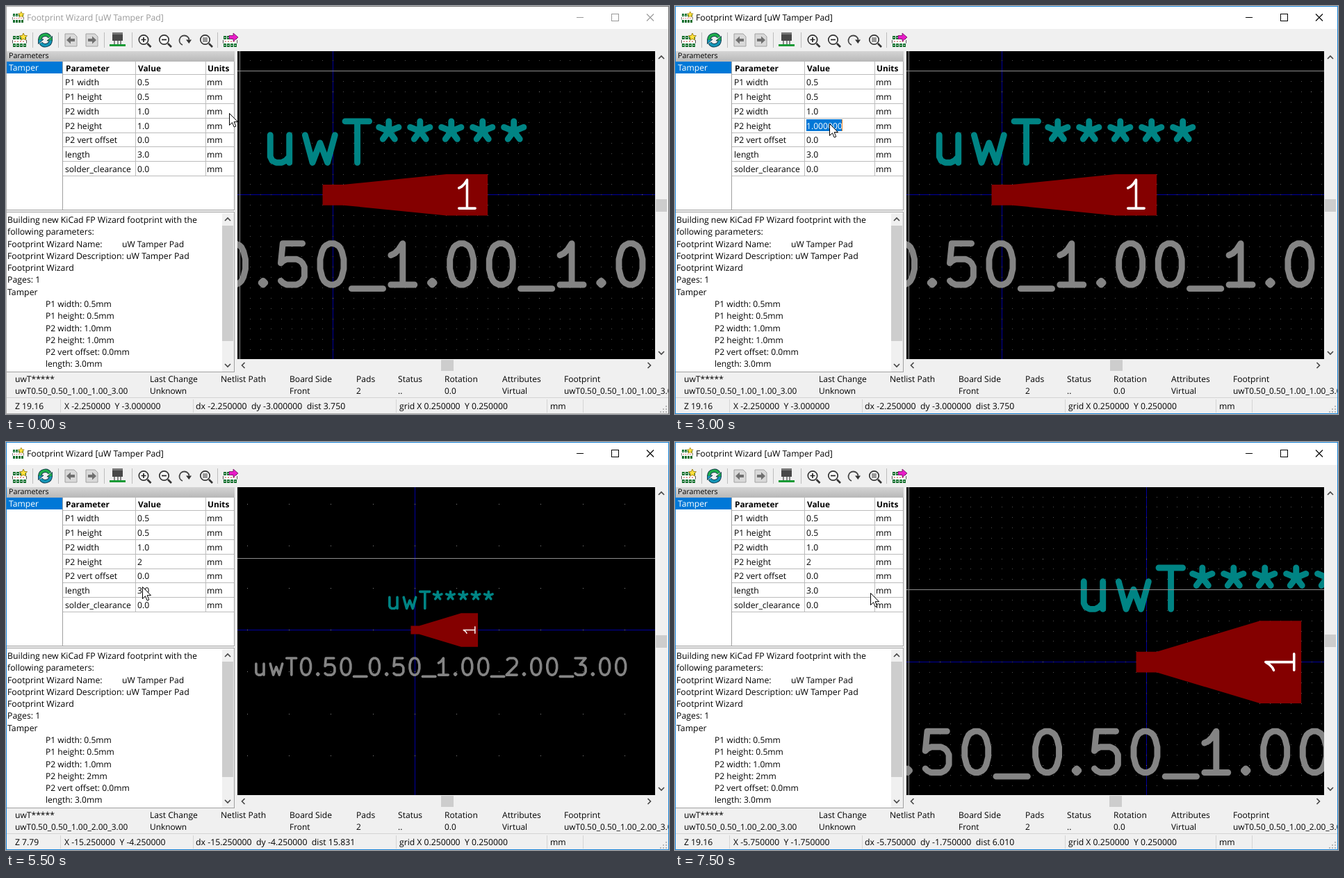
An HTML page for the animation above (8000 ms loop, 954x587 px).

```html
<!DOCTYPE html>
<html lang="en">
<head>
<meta charset="utf-8">
<title>Footprint Wizard</title>
<style>
html, body { margin: 0; width: 100%; height: 100%; overflow: hidden; background: #f0f0f0; }
svg { display: block; width: 954px; height: 587px; }
text { font-family: "Open Sans", "Noto Sans", sans-serif; white-space: pre; text-rendering: geometricPrecision; }
.crisp { shape-rendering: crispEdges; }
</style>
</head>
<body>
<svg id="stage" viewBox="0 0 954 587" xmlns="http://www.w3.org/2000/svg"></svg>
<script>
const LOOP = 8000;
const GREY = '#f0f0f0', BLUE = '#0078d7';

// Zoomed board views: origin, pixels per mm, pad height in mm
const VIEWS = {
  near: { ox: 470.4, oy: 271.8, s: 59.4, h: 1, zoom: '19.16', bar: [626, 278] },
  fit: { ox: 588.5, oy: 270.5, s: 24.15, h: 2, zoom: '7.79', bar: [626, 278] },
  close: { ox: 678.4, oy: 316.6, s: 59.4, h: 2, zoom: '19.16', bar: [625, 277] }
};

// start ms, pointer, view, crosshair in mm, edit mode, caret x
const STEPS = [
  [0, [321, 154], 'near', [-2.25, -3]],
  [500, [218, 138], 'near', [-2.25, -3]],
  [1000, [210, 150], 'near', [-2.25, -3]],
  [1500, [222, 170], 'near', [-2.25, -3]],
  [2000, [222, 170], 'near', [-2.25, -3], 'select', 240],
  [2500, [222, 169], 'near', [-2.25, -3], 'select'],
  [3000, [222, 169], 'near', [-2.25, -3], 'select', 240],
  [3500, null, 'near', [-2.25, -3], 'type', 196],
  [4000, [222, 169], 'fit', [-15.25, -4.25]],
  [5500, [196, 208], 'fit', [-15.25, -4.25]],
  [6000, [281, 222], 'fit', [-15.25, -4.25]],
  [6500, [573, 258], 'fit', [-0.75, -0.5]],
  [7000, [664, 295], 'close', [-0.25, -0.25]],
  [7500, [281, 217], 'close', [-5.75, -1.75]]
];

// Stroke font: advance and path, cap height 21 units, baseline at 0
const GLYPHS = {
  u: [20, 'M5.7-14V-3L6.7-1 8.7 0H11.5L13.5-1 15.4-3M15.4-14V0'],
  w: [22, 'M3.4-14L7.2 0 11-10 14.8 0 18.6-14'],
  T: [16, 'M1.8-21H14M8-21V0'],
  '*': [15.9, 'M8-21V-16M3-18L8-16 13-18M5-12L8-16 11-12'],
  0: [20, 'M9-21H11L13-20 14-19 15-17 16-13V-8L15-4 14-2 13-1 11 0H9L7-1 6-2 5-4 4-8V-13L5-17 6-19 7-20Z'],
  1: [20, 'M16 0H4M10 0V-21L8-18 6-16 4-15'],
  2: [20, 'M4-19L5-20 7-21H12L14-20 15-19 16-17V-15L15-12 3 0H16'],
  3: [20, 'M3-21H16L9-13H12L14-12 15-11 16-9V-4L15-2 14-1 12 0H6L4-1 3-2'],
  5: [20, 'M15-21H5L4-11 5-12 7-13H12L14-12 15-11 16-9V-4L15-2 14-1 12 0H7L5-1 4-2'],
  '.': [10, 'M5-2L6-1 5 0 4-1Z'],
  _: [16, 'M0 2H16']
};

const text = (x, y, s, size = 12.2, fill = '#000', extra = '') =>
  `<text x="${x}" y="${y}" font-size="${size}" fill="${fill}" ${extra}>${s}</text>`;
const rect = (x, y, w, h, fill) =>
  `<rect class="crisp" x="${x}" y="${y}" width="${w}" height="${h}" fill="${fill}"/>`;
const line = (d, color, w = 1, extra = '') =>
  `<path d="${d}" fill="none" stroke="${color}" stroke-width="${w}" ${extra}/>`;
const shape = (d, fill, stroke = 'none', w = 1) =>
  `<path d="${d}" fill="${fill}" stroke="${stroke}" stroke-width="${w}"/>`;
const at = (x, y, body, k = 1) => `<g transform="translate(${x} ${y}) scale(${k})">${body}</g>`;

function strokeText(s, cx, y, unit, width, color) {
  const total = [...s].reduce((sum, c) => sum + GLYPHS[c][0], 0);
  let x = -total / 2, out = '';
  for (const c of s) {
    out += `<path transform="translate(${x})" d="${GLYPHS[c][1]}"/>`;
    x += GLYPHS[c][0];
  }
  return `<g transform="translate(${cx} ${y}) scale(${unit})" fill="none" stroke="${color}"
    stroke-width="${width / unit}" stroke-linecap="round" stroke-linejoin="round">${out}</g>`;
}

// Toolbar icons
function chip() {
  let s = rect(1, 7, 19, 11, '#fff');
  for (let i = 0; i < 4; i++) {
    for (const y of [4, 15]) s += rect(1 + i * 5, y, 4, 5, '#14702f') + rect(2 + i * 5, y + 2, 2, 1, '#cfe8d4');
  }
  return s + line('M0.5 10V14.5M20.5 10V14.5', '#555') + line('M3 12H18', '#c33', 1, 'stroke-dasharray="2 2"');
}
const star = shape('M16 0L17.6 3.4 21.5 3.8 18.7 6.4 19.5 10.2 16 8.3 12.6 10.2 13.3 6.4 10.5 3.8 14.4 3.4Z', '#ffe23c', '#8a6d00', .8);
const lens = line('M14 14L19 19', '#333', 2.6) +
  '<circle cx="8.5" cy="8.5" r="6.7" fill="#fafafa" stroke="#333" stroke-width="1.7"/>';
const page = shape('M1 1H14L18 5V19H1Z', '#d9d9d9', '#a2a2a2');

function refresh() {
  const top = 'M2.8 10A7.7 7.7 0 0 1 17 6.4', low = 'M18.2 11A7.7 7.7 0 0 1 4 14.6';
  return line(top + low, '#10384a', 5.4) +
    shape('M20.5 5V11.5H13Z', '#1fae4b', '#10384a', .9) + shape('M.5 16V9.5H8Z', '#1596b8', '#10384a', .9) +
    line(top, '#1fae4b', 3.6) + line(low, '#1596b8', 3.6);
}

function toolbar() {
  const seps = [38.5, 75.5, 141.5, 181.5, 304.5].map(x => `M${x} 38V60`).join('');
  return rect(1, 33, 952, 32, GREY) + line(seps, '#bdbdbd') +
    at(9, 39, chip() + star) +
    at(46, 38.5, refresh()) +
    at(84, 39, page + shape('M3 10L9 4.5V8H15V12H9V15.5Z', '#707070')) +
    at(114, 39, page + shape('M16 10L10 4.5V8H4V12H10V15.5Z', '#707070')) +
    at(149, 38, rect(4, 0, 15, 12, '#484848') + rect(4, 0, 15, 3, '#777') +
      rect(6, 12, 2, 5, '#888') + rect(11, 12, 2, 5, '#888') + rect(15, 12, 2, 5, '#888') + rect(0, 17, 23, 3, '#159a35')) +
    at(189.5, 40, lens + line('M5 8.5H12M8.5 5V12', '#222', 1.7)) +
    at(219, 40, lens + line('M5 8.5H12', '#222', 1.7)) +
    at(248, 40, line('M6 16A7 7 0 1 1 15.5 8.5', '#444', 1.8) + shape('M11 8.5H19L15.3 14Z', '#333')) +
    at(278, 40, lens + rect(5, 5, 7, 7, '#999')) +
    at(312, 39, chip() + shape('M9 3.5H15V0L22 6 15 12V8.5H9Z', '#e81cc8', '#70105f', .8));
}

const chevron = (x, y, dir) => {
  const d = { up: 'M-4 2L0-2 4 2', down: 'M-4-2L0 2 4-2', left: 'M2-4L-2 0 2 4', right: 'M-2-4L2 0-2 4' }[dir];
  return at(x, y, line(d, '#444', 1.6));
};

function titleBar(active) {
  const ink = active ? '#000' : '#999';
  return rect(0, 0, 954, 33, '#fff') +
    at(9, 8, chip() + star, .8) +
    text(30, 21, 'Footprint Wizard [uW Tamper Pad]', 12.25, ink) +
    `<g class="crisp">${line('M821 16.5H831M871.5 11.5H881.5V21.5H871.5Z', ink)}</g>` +
    line('M922 11.5L932 21.5M932 11.5L922 21.5', ink, 1.1);
}

function border(active) {
  const edge = active
    ? line('M.5 .5H953.5V586.5H.5Z', '#1883d7')
    : line('M953 586.5H.5V.5H207', '#a8a8a8') + line('M207 .5H953.5V587', '#6e6e6e');
  return `<g class="crisp">${edge}</g>`;
}

function paramPanel(height, mode, caret) {
  const rows = [['P1 width', '0.5'], ['P1 height', '0.5'], ['P2 width', '1.0'], ['P2 height', height],
    ['P2 vert offset', '0.0'], ['length', '3.0'], ['solder_clearance', '0.0']];
  const bold = 'font-weight="700"';
  let s = rect(1, 65, 328, 15, 'url(#caption)') + text(4, 75, 'Parameters', 10.7) +
    rect(1, 80, 328, 213, '#fff') + rect(1, 80, 81, 17, BLUE) + text(4, 93, 'Tamper', 12.15, '#fff') +
    text(86, 94, 'Parameter', 11.8, '#000', bold) + text(190, 94, 'Value', 11.8, '#000', bold) +
    text(290, 94, 'Units', 11.8, '#000', bold);
  let d = 'M186.5 80V244M287.5 80V244M82 98.5H328';
  rows.forEach(([name, value], i) => {
    const y = Math.round(114.2 + i * 20.8);
    d += `M82 ${y + 5.5}H328`;
    s += text(85, y, name, 12.15) + text(289, y, 'mm', 12.15);
    if (i !== 3 || !mode) s += text(189, y, value, 12.15);
  });
  s += `<g class="crisp">${line(d, '#bcbcbc')}${line('M81.5 80V293M328.5 80V293M1 293.5H329', '#a0a0a0')}</g>`;
  if (mode === 'select') s += rect(189, 163, 52, 17, BLUE) + text(189, 177, '1.000000', 12.15, '#fff');
  if (mode === 'type') s += text(189, 177, '2', 12.15);
  if (caret) s += rect(caret, 163, 1, 17, mode === 'select' ? '#ff8728' : '#000');
  return s;
}

function logPanel(height) {
  const lines = ['Building new KiCad FP Wizard footprint with the', 'following parameters:',
    'Footprint Wizard Name:\tuW Tamper Pad', 'Footprint Wizard Description: uW Tamper Pad', 'Footprint Wizard',
    'Pages: 1', 'Tamper', '\tP1 width: 0.5mm', '\tP1 height: 0.5mm', '\tP2 width: 1.0mm',
    `\tP2 height: ${height}mm`, '\tP2 vert offset: 0.0mm', '\tlength: 3.0mm'];
  let s = rect(1, 297, 328, 230, '#fff');
  lines.forEach((l, i) => {
    const [a, b] = l.split('\t'), y = Math.round(312 + i * 17.28);
    if (a) s += text(2, y, a, 12.3);
    if (b) s += text(a ? 167 : 57, y, b, 12.1);
  });
  return s + rect(311, 298, 17, 228, GREY) + rect(311, 316, 16, 166, '#cdcdcd') +
    chevron(319, 307, 'up') + chevron(319, 517, 'down') +
    `<g class="crisp">${line('M1 296.5H328.5V526.5H1', '#a0a0a0')}</g>`;
}

function dots(v, pitch, color) {
  const p = pitch * v.s;
  let d = '';
  for (let x = v.ox - Math.floor((v.ox - 333) / p) * p; x < 934; x += p) {
    for (let y = v.oy - Math.floor((v.oy - 65) / p) * p; y < 508; y += p) {
      d += `M${Math.floor(x)} ${Math.floor(y)}h1v1h-1z`;
    }
  }
  return `<path class="crisp" d="${d}" fill="${color}"/>`;
}

function board(v, [cx, cy], value) {
  const { ox, oy, s, h } = v;
  const X = mm => ox + mm * s, Y = mm => oy + mm * s;
  const snap = n => Math.floor(n) + .5;
  const unit = s / 21, pen = .15 * s, drop = h / 2;
  const pad = [[-.25, -.25], [.25, -.25], [2.75, -drop], [3.75, -drop], [3.75, drop], [2.75, drop], [.25, .25], [-.25, .25]]
    .map(([x, y]) => `${X(x)},${Y(y)}`).join(' ');
  const num = strokeText('1', 0, .325 * s, .69 * s / 21, .06 * s, '#fff');
  const cross = `M333 ${snap(Y(cy))}H934M${snap(X(cx))} 65V508`;
  return `<g clip-path="url(#view)">` + rect(333, 65, 601, 443, '#000') +
    line(`M${snap(ox)} 65V508M333 ${snap(oy)}H934`, '#0000a0') +
    (s > 40 ? dots(v, .25, '#505050') : '') + dots(v, 2.5, '#848484') +
    `<polygon points="${pad}" fill="#840000"/>` +
    `<g transform="translate(${X(3.25)} ${Y(0)}) rotate(${h > 1 ? -90 : 0})">${num}</g>` +
    strokeText('uwT*****', X(1.485), Y(-.283 - drop), unit, pen, '#008484') +
    strokeText(value, X(1.5), Y(1.675 + drop), unit, pen, '#848484') +
    line(cross, '#8c8c8c') + '</g>';
}

function scrollBars([bx, by]) {
  return rect(934, 65, 18, 443, GREY) + rect(333, 508, 619, 18, GREY) +
    rect(935, by, 16, 18, '#cdcdcd') + rect(bx, 509, 18, 16, '#cdcdcd') +
    chevron(943, 74, 'up') + chevron(943, 499, 'down') + chevron(341.5, 517, 'left') + chevron(925.5, 517, 'right');
}

function infoBars(v, [x, y], value) {
  const cols = [[13, 'uwT*****', value], [207, 'Last Change', 'Unknown'], [309, 'Netlist Path', ''],
    [408, 'Board Side', 'Front'], [504, 'Pads', '2'], [564, 'Status', '..'], [631, 'Rotation', '0.0'],
    [714, 'Attributes', 'Virtual'], [803, 'Footprint', value]];
  const f = n => n.toFixed(6);
  let s = rect(1, 527, 952, 59, GREY);
  for (const [cx, name, val] of cols) s += text(cx, 541, name, 12.1) + text(cx, 558, val, 11.9);
  s += `<g class="crisp">${line('M1 563.5H953M78.5 566V585M269.5 566V585M561.5 566V585M778.5 566V585M830.5 566V585', '#d4d4d4')}</g>` +
    text(13, 580, 'Z ' + v.zoom) + text(84, 580, `X ${f(x)}  Y ${f(y)}`) +
    text(273, 580, `dx ${f(x)}  dy ${f(y)}  dist ${Math.hypot(x, y).toFixed(3)}`, 12.3) +
    text(566, 580, 'grid X 0.250000  Y 0.250000') + text(783, 580, 'mm');
  for (let i = 0; i < 3; i++) {
    for (let j = 0; j <= i; j++) s += rect(949 - j * 4, 575 + i * 4, 2, 2, '#b8b8b8');
  }
  return s;
}

const pointer = ([x, y]) =>
  at(x + .5, y + .5, shape('M0 0V17L4 13.2 6.7 19.6 9.3 18.5 6.6 12.2H12Z', '#fff', '#000'));

const defs = `<defs>
  <linearGradient id="caption" x1="0" y1="0" x2="0" y2="1">
    <stop offset="0" stop-color="#d4d4d4"/><stop offset="1" stop-color="#b8b8b8"/>
  </linearGradient>
  <clipPath id="view"><rect x="333" y="65" width="601" height="443"/></clipPath>
</defs>`;

function draw([start, mouse, viewName, cross, mode, caret]) {
  const v = VIEWS[viewName], active = start >= 2000;
  const value = `uwT0.50_0.50_1.00_${v.h}.00_3.00`;
  const height = v.h > 1 ? '2' : '1.0';
  return defs + rect(0, 0, 954, 587, GREY) + titleBar(active) + toolbar() +
    paramPanel(height, mode, caret) + logPanel(height) +
    board(v, cross, value) + scrollBars(v.bar) + infoBars(v, cross, value) +
    border(active) + (mouse ? pointer(mouse) : '');
}

const stage = document.getElementById('stage');
let shown = null;
function tick() {
  const t = performance.now() % LOOP;
  const step = STEPS.findLast(s => s[0] <= t);
  if (step !== shown) {
    stage.innerHTML = draw(step);
    shown = step;
  }
  requestAnimationFrame(tick);
}
tick();
</script>
</body>
</html>
```
